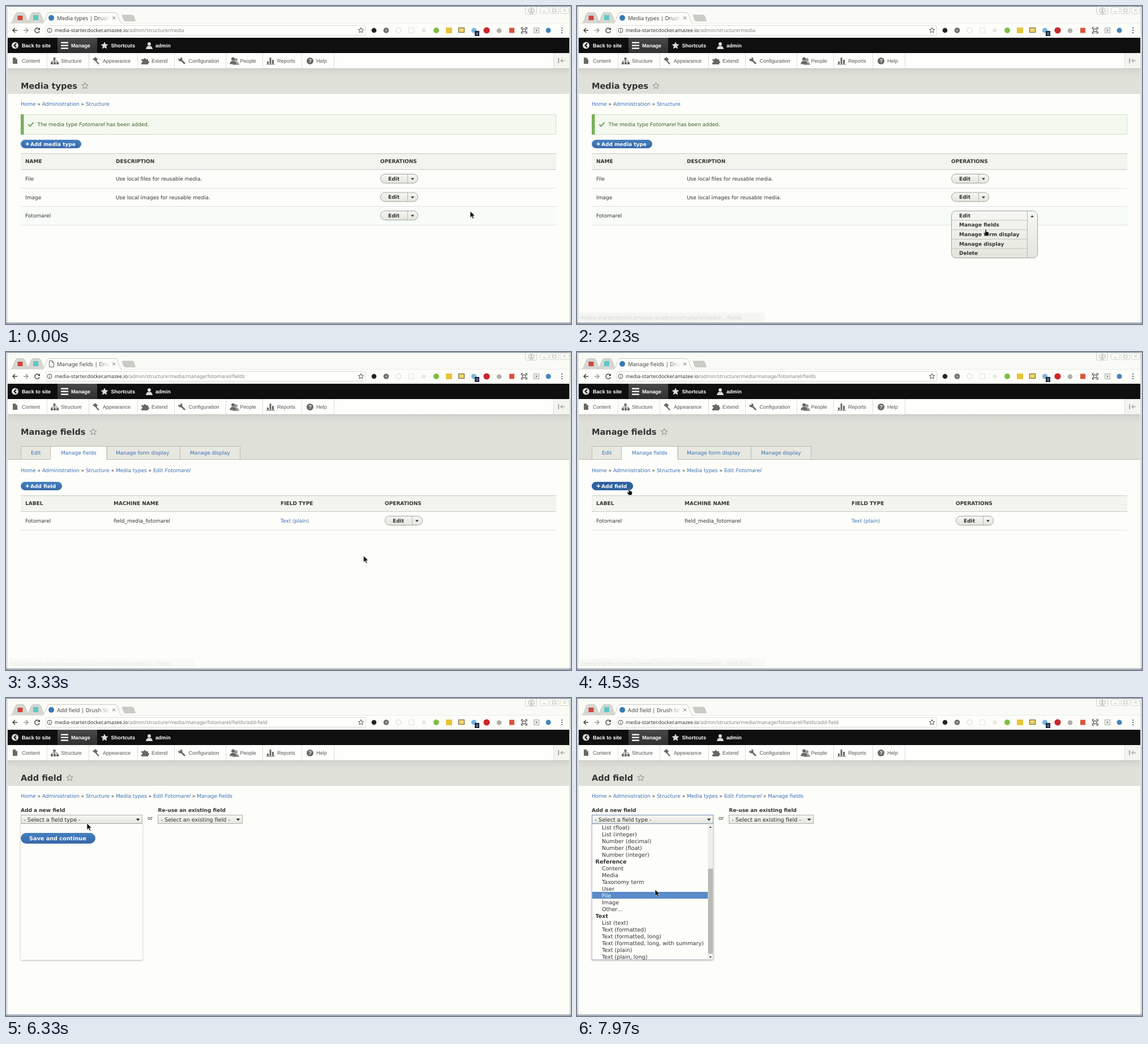
An HTML page for the animation above (8 s loop, 998 px wide and 561 px high).

```html
<!DOCTYPE html>
<html lang="en">
<head>
<meta charset="utf-8">
<title>Media types</title>
<style>
html, body { margin: 0; width: 100%; height: 100%; overflow: hidden; background: #fdfdfa; }
svg { display: block; }
#stage { width: 100%; height: 100%; }
text { font: 9px "DejaVu Sans", sans-serif; fill: #333; white-space: pre; text-rendering: geometricPrecision; }
.b { font-weight: bold; }
.h { font-weight: bold; font-size: 14.55px; }
.l { fill: #3a70b5; }
.i { font-style: italic; }
.w { fill: #fdfdfa; }
.ok { fill: #3f6328; }
.save { font-size: 9.67px; }
.badge { font-size: 6px; }
.ui { font: 9.1px "Liberation Sans", Arial, sans-serif; fill: #555; }
.bar { font: bold 9.1px "Liberation Sans", Arial, sans-serif; fill: #fff; }
.tab { font: 9.7px "Noto Sans", sans-serif; fill: #444; }
.url { font: 8.83px "Noto Sans", sans-serif; fill: #85857f; }
.status { font: 9.5px "Noto Sans", sans-serif; fill: #9a9a96; }
.opt { font-size: 9.65px; }

/* one percent is 80 ms */
.a { animation: 8s infinite; }
.cut { animation-timing-function: step-end; opacity: 0; }
.p1 { animation-name: p1; } .p2 { animation-name: p2; } .p3 { animation-name: p3; }
.load { animation-name: load; } .icon { animation-name: icon; }
.menu { animation-name: menu; } .over { animation-name: over; }
.popup { animation-name: popup; } .items { animation-name: items; }
.hand { animation-name: hand; } .arrow { animation-name: arrow; }
.s1 { animation-name: s1; opacity: 0; } .s2 { animation-name: s2; opacity: 0; }
.cursor { animation-name: cursor; animation-timing-function: ease-in-out; }
.scroll { animation-name: scroll; animation-timing-function: step-end; }
.thumb { animation-name: thumb; animation-timing-function: step-end; }
.pick { animation-name: pick; animation-timing-function: step-end; }
@keyframes p1 { 0% { opacity: 1 } 37% { opacity: 0 } }
@keyframes p2 { 0% { opacity: 0 } 37% { opacity: 1 } 66.5% { opacity: 0 } }
@keyframes p3 { 0% { opacity: 0 } 66.5% { opacity: 1 } }
@keyframes load { 0% { opacity: 0 } 37% { opacity: 1 } 44% { opacity: 0 } 66.5% { opacity: 1 } 71% { opacity: 0 } }
@keyframes icon { 0% { opacity: 1 } 37% { opacity: 0 } 44% { opacity: 1 } 66.5% { opacity: 0 } 71% { opacity: 1 } }
@keyframes menu { 0% { opacity: 0 } 16% { opacity: 1 } 37% { opacity: 0 } }
@keyframes over { 0% { opacity: 0 } 54.5% { opacity: 1 } 66.5% { opacity: 0 } }
@keyframes popup { 0% { opacity: 0 } 78.5% { opacity: 1 } }
@keyframes items { 0% { opacity: 0 } 80% { opacity: 1 } }
@keyframes hand { 0% { opacity: 0 } 13% { opacity: 1 } 37% { opacity: 0 } 54.5% { opacity: 1 } 66.5% { opacity: 0 } }
@keyframes arrow { 0% { opacity: 1 } 13% { opacity: 0 } 37% { opacity: 1 } 54.5% { opacity: 0 } 66.5% { opacity: 1 } }
@keyframes s1 { 0%, 25.5% { opacity: 0 } 27.9%, 39% { opacity: .4 } 41.6% { opacity: .22 } 43%, 100% { opacity: 0 } }
@keyframes s2 { 0%, 55% { opacity: 0 } 56.6%, 66% { opacity: .27 } 68.5%, 100% { opacity: 0 } }
@keyframes cursor {
  0%, 4% { transform: translate(820px, 362px) }
  14%, 19% { transform: translate(718px, 367px) }
  27%, 34% { transform: translate(722px, 394px) }
  36% { transform: translate(720px, 393px); animation-timing-function: ease-in }
  41.6% { transform: translate(634px, 360px); animation-timing-function: ease-out }
  55.5%, 64% { transform: translate(92px, 241px) }
  73%, 77% { transform: translate(143px, 215px) }
  79.1%, 82% { transform: translate(143px, 221px) }
  89%, 92.5% { transform: translate(145px, 313px) }
  99%, 100% { transform: translate(138px, 338px) }
}
@keyframes scroll { 0% { transform: none } 89.5% { transform: translateY(-48px) } 91% { transform: translateY(-96px) } 92.5% { transform: translateY(-108px) } }
@keyframes thumb { 0% { transform: none } 89.5% { transform: translateY(29.8px) } 91% { transform: translateY(59.6px) } 92.5% { transform: translateY(67px) } }
@keyframes pick {
  0% { transform: none }
  84% { transform: translateY(24px) } 85% { transform: translateY(36px) }
  86% { transform: translateY(48px) } 87% { transform: translateY(60px) }
  87.6% { transform: translateY(72px) } 88.3% { transform: translateY(84px) }
  91% { transform: translateY(132px) } 92.5% { transform: translateY(192px) }
  94.5% { transform: translateY(204px) } 96% { transform: translateY(216px) }
  98% { transform: translateY(228px) }
}
</style>
</head>
<body>
<svg id="stage" viewBox="0 0 998 561" preserveAspectRatio="none"></svg>
<script>
const NAME = 'Fotomarel';
const HOST = 'media-starter.docker.amazee.io';
const INK = '#333', LINE = '#bfc0b6', PAPER = '#fdfdfa', EDGE = '#3a6dae';

const text = (x, y, s, cls = '') => `<text x="${x}" y="${y}" class="${cls}">${s}</text>`;
const rect = (x, y, w, h, fill, more = '') => `<rect x="${x}" y="${y}" width="${w}" height="${h}" fill="${fill}" ${more}/>`;
const path = (d, fill = 'none', more = '') => `<path d="${d}" fill="${fill}" ${more}/>`;
const line = (d, color = LINE, w = 1) => path(d, 'none', `stroke="${color}" stroke-width="${w}"`);
const dot = (x, y, r, fill, more = '') => `<circle cx="${x}" cy="${y}" r="${r}" fill="${fill}" ${more}/>`;
const group = (cls, ...parts) => `<g class="${cls}">${parts.join('')}</g>`;
const crop = (x, y, w, h, body) => `<svg x="${x}" y="${y}" width="${w}" height="${h}" overflow="hidden">${body}</svg>`;
const down = (x, y, s = 3) => path(`M${x - s} ${y - s / 2}h${2 * s}l${-s} ${s + .5}z`, INK);
const up = (x, y, s = 3) => path(`M${x - s} ${y + s / 2}h${2 * s}l${-s} ${-s - .5}z`, INK);

function star(x, y, r, fill, stroke) {
  const points = Array.from({ length: 10 }, (_, k) => {
    const a = k * Math.PI / 5, q = k % 2 ? r * .45 : r;
    return `${(x + q * Math.sin(a)).toFixed(2)},${(y - q * Math.cos(a)).toFixed(2)}`;
  });
  return `<polygon points="${points.join(' ')}" fill="${fill}" stroke="${stroke}" stroke-width="1"/>`;
}

const defs = `<defs>
  <linearGradient id="btn" x2="0" y2="1"><stop stop-color="#f7f7f3"/><stop offset="1" stop-color="#e4e5dc"/></linearGradient>
  <linearGradient id="blue" x2="0" y2="1"><stop stop-color="#4280c1"/><stop offset="1" stop-color="#3767a8"/></linearGradient>
  <linearGradient id="lit" x2="0" y2="1"><stop stop-color="#484848"/><stop offset="1" stop-color="#303030"/></linearGradient>
  <linearGradient id="shade" x2="0" y2="1"><stop stop-color="#888" stop-opacity=".14"/><stop offset="1" stop-color="#888" stop-opacity="0"/></linearGradient>
  <linearGradient id="fade"><stop stop-color="${PAPER}" stop-opacity="0"/><stop offset="1" stop-color="${PAPER}"/></linearGradient>
  <filter id="soft" x="-10%" y="-10%" width="120%" height="120%"><feDropShadow dx="0" dy="1" stdDeviation="1.6" flood-opacity=".3"/></filter>
  <clipPath id="picked"><rect class="a pick" width="205" height="12"/></clipPath>
</defs>`;

// Browser window
const tabShape = (x, w, fill) => path(`M${x} 30.5C${x + 6} 29 ${x + 6} 13 ${x + 12} 11.5H${x + w - 12}C${x + w - 6} 13 ${x + w - 6} 29 ${x + w} 30.5`, fill, 'stroke="#bfc0ba" stroke-width=".8"');

function extensions() {
  const faint = '#d3d4ce';
  return dot(650, 43, 4.3, '#222') + dot(671.5, 43, 4.8, '#6f706b') + dot(671.5, 43, 1.6, '#bbb')
    + dot(693.5, 43, 4.5, 'none', `stroke="${faint}"`) + rect(711.5, 38.5, 9, 9, 'none', `stroke="${faint}" stroke-dasharray="2 1"`)
    + dot(738, 43, 3.5, '#e6e7e1') + dot(760, 43, 5, '#80bd45') + rect(777, 38, 11, 10, '#e9c437')
    + rect(799.5, 38.5, 10, 8, '#edd46c', 'stroke="#6b5a24"') + dot(826.5, 43, 4.6, '#79b7de')
    + rect(828, 44, 8, 9, '#1d2540') + text(830.2, 51, '0', 'w badge')
    + dot(849, 43, 5.6, '#c9272d') + dot(871, 43.5, 4.3, '#b0b1ac') + rect(889, 38.5, 9, 9, '#d9533a')
    + line('M910.5 41v-3h3M917 38h3v3M920 45v3h-3M913.5 48h-3v-3', INK, 1.2) + rect(912.5, 40.5, 5.5, 5, 'none', `stroke="${INK}"`)
    + rect(932.5, 38.5, 9, 9, '#eee', 'stroke="#aaaba6"') + path('M936 40.5v5l3-2.5z', '#888')
    + dot(958, 43, 4.5, '#4583bd') + [39, 43, 47].map(y => dot(982, y, 1.1, '#444')).join('');
}

function windowButtons() {
  const c = '#cdcec9', box = x => rect(x - 7.5, 2.5, 15, 11, 'none', `rx="2" stroke="${c}" stroke-width=".8"`);
  return rect(917.5, .5, 20, 14, 'none', `rx="3" stroke="${c}"`) + dot(928, 8, 5, 'none', 'stroke="#aaa"') + dot(928, 6.5, 1.6, '#aaa') + path('M925 11q3-4 6 0z', '#aaa')
    + [951, 968.5, 986.5].map(box).join('') + line('M948 10h6', '#bbb') + rect(965.5, 5.5, 6, 5, 'none', 'stroke="#bbb"') + line('M984 5l5 5m0-5l-5 5', '#bbb');
}

const chrome = rect(0, 0, 998, 561, PAPER) + rect(0, 0, 998, 31, '#fafbf6')
  + tabShape(8, 34, '#d6d7d1') + tabShape(36, 34, '#d6d7d1')
  + rect(20.5, 17, 9, 8, '#cf473e') + rect(48, 16, 9, 9, '#5fc7c4')
  + path('M205 16h18q2 0 2.5 2l3 8.5h-18q-2 0-2.5-2z', '#cbccc6', 'stroke="#b9bab4" stroke-width=".7"')
  + line('M3 30.5H995', '#e6e7e1', .8) + tabShape(64, 141, PAPER) + rect(66, 30, 137, 1.5, PAPER)
  + line('M188 18.5l5 5m0-5l-5 5', '#666') + windowButtons()
  + line('M20 43H12m4-4l-4 4 4 4', '#444', 1.5) + line('M31 43h8m-4-4l4 4-4 4', '#999', 1.5)
  + line('M58.7 41a4.2 4.2 0 1 0 .4 3.5', '#444', 1.4) + path('M60 38v4.3h-4.3z', '#444')
  + rect(70.5, 34.5, 565, 17, '#fefefc', 'rx="2" stroke="#dddeda"')
  + dot(77, 43, 4, 'none', 'stroke="#555"') + line('M77 42.5v3M77 40v1.2', '#555')
  + star(627, 43, 5, 'none', '#555') + extensions();

// Admin toolbars
const person = (x, y, fill) => dot(x, y - 3, 3, fill) + path(`M${x - 6} ${y + 6}q1-5 4-5.5h4q3 .5 4 5.5z`, fill);
const G = '#686964';
const toolbar = rect(3, 56, 992, 27, '#0f0f0f') + rect(91, 56, 70, 27, 'url(#lit)')
  + dot(16, 69.5, 6, '#ddd') + line('M18 66l-3.5 3.5L18 73', '#0f0f0f', 1.8) + text(28, 73, 'Back to site', 'bar')
  + [63.5, 68.5, 73.5].map(y => rect(97, y, 13, 2.3, '#fff')).join('') + text(115, 73, 'Manage', 'bar')
  + star(174, 70, 6, '#ddd', '#ddd') + text(185.5, 73, 'Shortcuts', 'bar') + person(253, 70, '#ddd') + text(264, 73, 'admin', 'bar')
  + rect(3, 83, 992, 28, '#fefefc') + rect(967, 83, 28, 27, '#f4f5f0')
  + line('M3 110.5H995', '#c4c5bb')
  + [72, 146, 232, 297, 388, 453, 522, 579, 967].map(x => line(`M${x}.5 83v27`, '#dddeda')).join('')
  + path('M12 91h5l3 3v8h-8z', G) + path('M17 91v3h3z', '#ccc')
  + path('M83.5 91h4v4h-4zM79 99h4v4h-4zM84 99h4v4h-4zM89 99h4v4h-4z', G) + line('M85.5 94v5M81 99v-2h10v2', G)
  + path('M153 94l5-4 4 4-3 4z', G) + line('M159 97l5 5.5', G, 2)
  + path('M239 94h4a2 2 0 1 1 4 0h4v3a2 2 0 1 1 0 4v2h-12v-3a2 2 0 1 0 0-4z', G)
  + line('M309 95l7 7', G, 2.8) + dot(308, 94, 3.6, G) + path('M307 89l2 4-4 .5-1-3z', '#fefefc')
  + person(406, 98, '#999') + person(401, 96.5, G)
  + path('M461 98h3v4h-3zM465.5 91h3v11h-3zM470 95h3v7h-3z', G) + rect(460, 102.5, 15, 1, G)
  + dot(537, 97, 6, G) + text(534.4, 100.4, '?', 'bar')
  + [[28, 'Content'], [97, 'Structure'], [171, 'Appearance'], [257, 'Extend'], [322.5, 'Configuration'], [413.5, 'People'], [479, 'Reports'], [548, 'Help']]
    .map(([x, s]) => text(x, 100.2, s, 'ui')).join('')
  + line('M976 92v9', '#a9aaa5', 2) + line('M987 96.5h-7m3-3l-3 3 3 3', '#a9aaa5', 1.4);

// Page pieces
const head = (title, starX, bottom) => rect(3, 111, 992, bottom - 111, '#dfe0d8') + rect(3, 111, 992, 12, 'url(#shade)')
  + text(26, 146.2, title, 'h') + star(starX, 141, 6, 'none', '#8b8c87') + rect(3, bottom, 992, 559 - bottom, PAPER);
const tab = (title, rest) => crop(88, 12, 96, 18, text(2, 12.5, title + ' | Drush Site', 'tab') + rect(75, 0, 21, 18, 'url(#fade)'))
  + `<text x="86" y="46.3" class="url"><tspan fill="#333">${HOST}</tspan>/admin/structure/media${rest}</text>`;
const crumbs = (y, ...items) => `<text x="26" y="${y}">${items.map(s => `<tspan class="l">${s}</tspan>`).join(' » ')}</text>`;
const trail = ['Home', 'Administration', 'Structure'];
const editCrumb = `Edit <tspan class="i">${NAME}</tspan>`;
const primary = (y, w, label, fill = 'url(#blue)') => rect(26.5, y + .5, w - 1, 14, fill, `rx="7" stroke="${EDGE}" stroke-width=".8"`)
  + line(`M34.5 ${y + 7.5}h6.5m-3.25-3.25v6.5`, '#fff', 1.4) + text(43, y + 10.8, label, 'b w');
const tableHead = (y, cells) => rect(26, y, 946, 29, '#f3f4ee') + line(`M26 ${y + .5}H972M26 ${y + 28.5}H972`, '#c9cac3')
  + cells.map(([x, s]) => text(x, y + 17.3, s, 'b')).join('');
const rule = y => line(`M26 ${y + .5}H972`, '#e2e3e3');
const dropButton = (x, y) => rect(x + .5, y + .5, 66, 16, 'url(#btn)', 'rx="8" stroke="#a3a49c"')
  + line(`M${x + 48.5} ${y + 1}v15`, '#b5b6ae') + text(x + 14, y + 11.8, 'Edit', 'b') + down(x + 57, y + 9);

const actions = ['Edit', 'Manage fields', 'Manage form display', 'Manage display', 'Delete'];
const openMenu = rect(661.5, 361.5, 152, 83, 'url(#btn)', 'rx="8" stroke="#a3a49c"') + line('M795.5 362v82', '#b5b6ae')
  + actions.map((s, k) => (k ? line(`M662 ${361.5 + k * 16.6}H795`, '#c3c4bc') : '') + text(675, 372.8 + k * 16.6, s, 'b')).join('') + up(804, 371);

const mediaTypes = head('Media types', 139.5, 155) + tab('Media types', '') + crumbs(176.2, ...trail)
  + rect(26.5, 191.5, 945, 35, '#f3f9ef', 'stroke="#cfe2c4"') + rect(26, 191, 5.5, 36, '#79b05c')
  + line('M39.5 209l3 3 6-6.5', '#6fa653', 2)
  + `<text x="55.5" y="211.8" class="ok">The media type <tspan class="i">${NAME}</tspan> has been added.</text>`
  + primary(236, 107, 'Add media type')
  + tableHead(260, [[34, 'NAME'], [194, 'DESCRIPTION'], [661, 'OPERATIONS']])
  + rect(26, 354, 946, 32, '#f7fcf9') + [321, 353, 386].map(rule).join('')
  + text(34, 308, 'File') + text(194, 308, 'Use local files for reusable media.')
  + text(34, 340.5, 'Image') + text(194, 340.5, 'Use local images for reusable media.') + text(34, 373, NAME)
  + [296, 328.5, 361].map(y => dropButton(661, y)).join('') + group('a cut menu', rect(661, 360, 70, 20, '#f7fcf9'), openMenu);

const localTab = (x, w, label, tx) => rect(x + .5, 166.5, w, 24, '#e7e8e0', 'stroke="#bdbea9"') + text(tx, 181.2, label, 'l');
const manageFields = head('Manage fields', 154, 190) + line('M3 189.5H995', '#bdbea9')
  + localTab(26, 53, 'Edit', 44) + localTab(178, 129, 'Manage form display', 194) + localTab(307, 106, 'Manage display', 325)
  + rect(26, 190, 389, 3, PAPER) + line('M26 189.5H414', '#bdbea9') + path('M78.5 190v-23.5h99.5v23.5', PAPER, 'stroke="#bdbea9"')
  + text(97, 181.2, 'Manage fields', 'l') + tab('Manage fields', `/manage/${NAME.toLowerCase()}/fields`)
  + crumbs(211.5, ...trail, 'Media types', editCrumb)
  + primary(229, 73, 'Add field') + group('a cut over', primary(229, 73, 'Add field', '#2d609d'))
  + tableHead(253, [[34, 'LABEL'], [190, 'MACHINE NAME'], [485, 'FIELD TYPE'], [669, 'OPERATIONS']]) + rule(314)
  + text(34, 301, NAME) + text(190, 301, 'field_media_' + NAME.toLowerCase()) + text(485, 301, 'Text (plain)', 'l') + dropButton(669, 289);

// Field type list; names with a leading # are group titles
const options = `- Select a field type -|#General|Boolean|Comments|Date|Email|Link|Timestamp|#Number|List (float)|List (integer)|Number (decimal)|Number (float)|Number (integer)|#Reference|Content|Media|Taxonomy term|User|File|Image|Other…|#Text|List (text)|Text (formatted)|Text (formatted, long)|Text (formatted, long, with summary)|Text (plain)|Text (plain, long)`.split('|');
const optionList = cls => options.map((s, k) => s[0] === '#' ? text(6, k * 12 + 9.5, s.slice(1), 'opt b ' + cls)
  : text(k ? 17.5 : 6, k * 12 + 9.5, s, 'opt ' + cls)).join('');
const select = (x, w, label) => rect(x + .5, 206.5, w - 1, 15, 'url(#btn)', 'stroke="#b0b1aa"') + text(x + 5.5, 217.5, label, 'opt') + down(x + w - 8, 214.5, 3.5);
const saveButton = rect(26.5, 238.5, 131, 18, 'url(#blue)', `rx="9" stroke="${EDGE}" stroke-width=".8"`) + text(41, 251, 'Save and continue', 'b w save');
const scrolled = group('a scroll', optionList(''), rect(0, 0, 205, 12, '#598bc9', 'class="a pick"'), `<g clip-path="url(#picked)">${optionList('w')}</g>`);
const popup = group('a cut popup', rect(26, 222, 215, 240, PAPER, 'filter="url(#soft)"'), saveButton)
  + group('a cut items', rect(26.5, 206.5, 214, 15, 'none', 'stroke="#7590b5"'), rect(26.5, 222, 214, 239.5, PAPER, 'stroke="#a9b4c2" stroke-width=".8"'),
    crop(26.5, 222, 204.5, 240, scrolled),
    rect(231, 222, 9.5, 239.5, '#eeefeb'), rect(231.5, 234, 8.5, 150, '#b9bab6', 'class="a thumb"'), up(235.7, 228, 2.2), down(235.7, 457, 2.2));
const addField = head('Add field', 112.5, 155) + tab('Add field', `/manage/${NAME.toLowerCase()}/fields/add-field`)
  + crumbs(176.2, ...trail, 'Media types', editCrumb, 'Manage fields')
  + text(26, 201.2, 'Add a new field', 'b') + text(268.5, 201.2, 'Re-use an existing field', 'b') + text(250, 215.3, 'or')
  + select(26, 215, '- Select a field type -') + select(268, 150, '- Select an existing field -')
  + saveButton + popup;

const status = (cls, end) => group('a ' + cls, path('M3 541H329q3 0 3 3v14H3z', '#ebece7'), text(6, 552.5, `${HOST}/admin/structure/media/.../${end}`, 'status'));
const favicon = group('a cut icon', dot(80, 21, 5, '#3779b5'))
  + group('a cut load', path('M76.5 15.5h5l3 3v8h-8z', PAPER, 'stroke="#666"'), line('M81.5 15.5v3h3', '#666'));
const frame = line('M0 .5H998', '#5d7384') + line('M1.5 0V561M996.5 0V561', '#a3aab5') + line('M0 559.5H998', '#69798a', 1.5);
const cursor = group('a cursor',
  group('a cut arrow', path('M0 0v11.5l2.7-2.5 1.9 4.3 2-.9-1.9-4.2h3.7z', '#111', 'stroke="#fff" stroke-width=".6"')),
  group('a cut hand', path('M-1 .8q1.1-1.6 2 0v3.2l4.3 1v4l-1 2.5h-4.8l-3.3-4.5q.3-1.6 2.8.2z', '#111', 'stroke="#fff" stroke-width=".5"')));

document.getElementById('stage').innerHTML = defs + chrome + toolbar
  + group('a cut p1', mediaTypes) + group('a cut p2', manageFields) + group('a cut p3', addField)
  + favicon + status('s1', 'fields') + status('s2', 'add-field') + frame + cursor;
</script>
</body>
</html>
```
